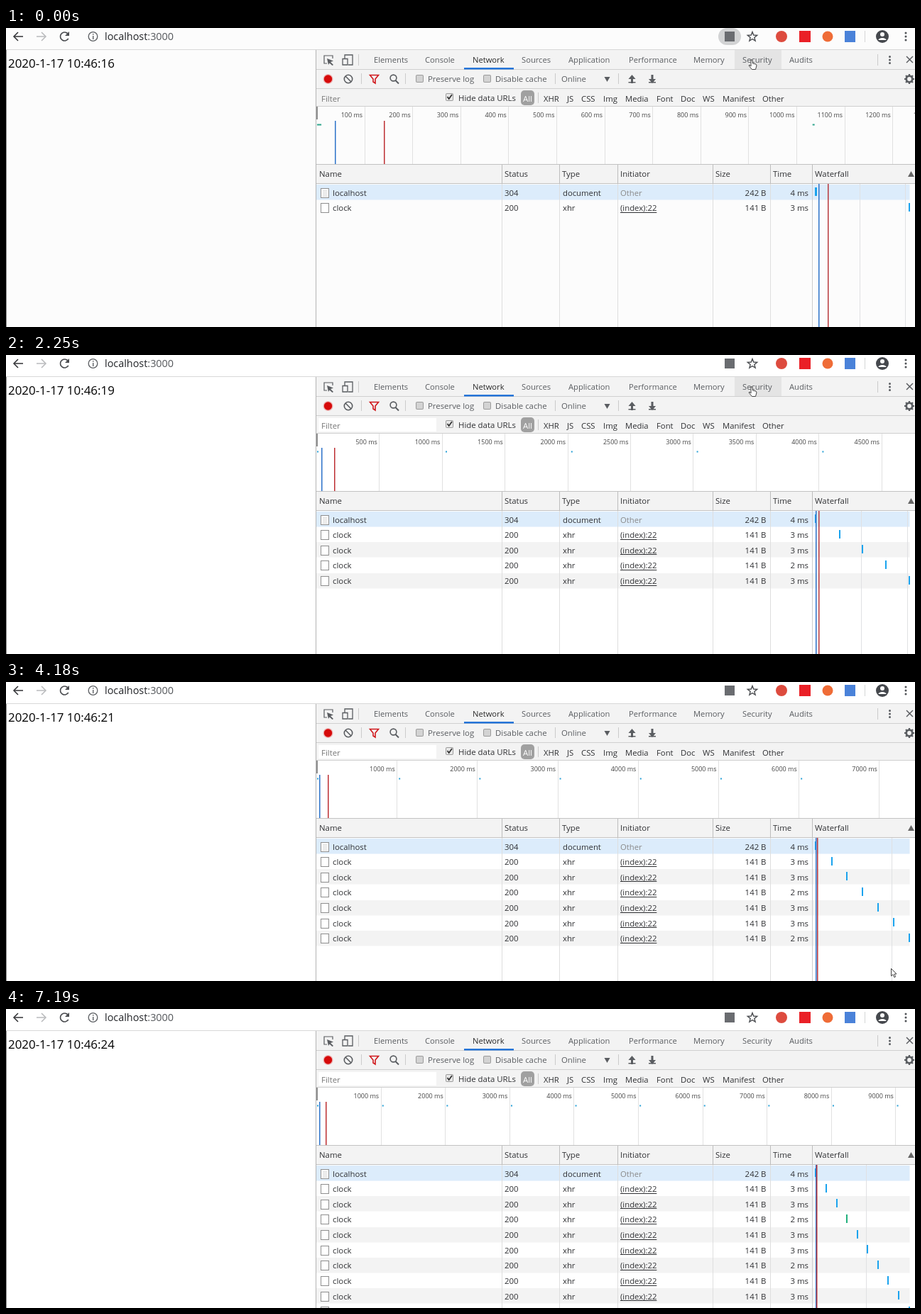
An HTML page with a canvas for the animation above (7770 ms loop, 1280 by 422 pixels).

```html
<!DOCTYPE html>
<html lang="en">
<head>
<meta charset="utf-8">
<title>Polling clock</title>
<style>
html, body { margin: 0; width: 100%; height: 100%; overflow: hidden; background: #fff; }
canvas { display: block; width: 1280px; height: 422px; }
</style>
</head>
<body>
<canvas id="stage" width="1280" height="422"></canvas>
<script>
const ctx = document.getElementById('stage').getContext('2d');
const LOOP = 7770, LEFT = 437, ROW_TOP = 221, ROW_H = 21.65;
const FONT = '"Open Sans", "Noto Sans", sans-serif';
const BAR = '#f3f3f3', INK = '#303134', GREY = '#5a5d61';

// Moments at which each part gains one more request.
const ticks = [120, 1210, 2250, 3220, 4060, 5090, 6070, 7070];
const chartSteps = [[0, 1, 1247], [240, 2, 2436], [1350, 3, 3600], [2250, 4, 4768],
  [3220, 5, 5953], [4180, 6, 7447], [6070, 8, 9305], [7190, 9, 9305]];
const pointerSteps = [[0, 1046, 45], [2530, 1047, 60], [2690, 1152, 194], [2830, 1186, 252],
  [2950, 1192, 290], [3070, 1192, 318], [3220, 1192, 331], [3370, 1197, 339], [3490, 1201, 346],
  [3640, 1218, 366], [3790, 1229, 377], [3910, 1237, 388], [4060, 1243, 397], [4180, 1246, 404],
  [4310, 1246, 412], [4430, 1246, 419], [4700, 1245, 386], [4820, 1241, 335], [4940, 1238, 299],
  [5670, 1248, 330], [5790, 1260, 368], [5910, 1272, 400], [6070, -50, -50]];

const at = (steps, t) => steps.filter(s => s[0] <= t).pop();
const sentAt = k => 1000 * k + 35;

function rect(x, y, w, h, color) {
  ctx.fillStyle = color;
  ctx.fillRect(x, y, w, h);
}
function text(s, x, y, size = 11.4, color = INK, align = 'left', weight = 400) {
  ctx.font = `${weight} ${size}px ${FONT}`;
  ctx.fillStyle = color;
  ctx.textAlign = align;
  ctx.fillText(s, x, y);
}
function trace(points, color, width = 1.5, close = false) {
  ctx.beginPath();
  points.forEach(([x, y]) => ctx.lineTo(x, y));
  if (close) ctx.closePath();
  ctx.strokeStyle = color;
  ctx.lineWidth = width;
  ctx.stroke();
}
function shape(points, color) {
  ctx.beginPath();
  points.forEach(([x, y]) => ctx.lineTo(x, y));
  ctx.fillStyle = color;
  ctx.fill();
}
function disc(x, y, r, color) {
  ctx.beginPath();
  ctx.arc(x, y, r, 0, 7);
  ctx.fillStyle = color;
  ctx.fill();
}
function ring(x, y, r, color, width = 1.5, from = 0, to = 2 * Math.PI) {
  ctx.beginPath();
  ctx.arc(x, y, r, from, to);
  ctx.strokeStyle = color;
  ctx.lineWidth = width;
  ctx.stroke();
}
function pill(x, y, w, h, r, color) {
  ctx.beginPath();
  ctx.roundRect(x, y, w, h, r);
  ctx.fillStyle = color;
  ctx.fill();
}
function dots(x, y, gap, color) {
  for (let i = -1; i <= 1; i++) disc(x, y + i * gap, 1.5, color);
}
function gridStep(pxPerMs) {
  for (let unit = 100; ; unit *= 10)
    for (const m of [1, 2, 5]) if (unit * m * pxPerMs >= 60) return unit * m;
}

function addressBar(t) {
  trace([[24, 12], [11, 12]], INK);
  trace([[17, 6], [11, 12], [17, 18]], INK);
  trace([[43, 12], [56, 12]], '#b9babc');
  trace([[50, 6], [56, 12], [50, 18]], '#b9babc');
  ring(82.5, 12, 6, '#4a4c50', 1.7, 0.5, 5.5);
  shape([[89, 5], [89, 11], [83, 11]], '#4a4c50');
  ring(122.5, 12, 6.3, GREY, 1.3);
  rect(122, 11, 1.4, 5, GREY);
  rect(122, 8, 1.4, 1.6, GREY);
  text('localhost', 139, 17, 14.4, '#222428');
  ctx.font = `14.4px ${FONT}`;
  text(':3000', 139 + ctx.measureText('localhost').width, 17, 14.4, '#54575b');

  if (t < 240) pill(1003, 0, 32, 24, 12, t < 120 ? '#d2d3d4' : '#e8e8e9');
  rect(1012, 5, 14, 14, '#6a6c70');
  const star = [];
  for (let i = 0; i < 10; i++) {
    const a = i * Math.PI / 5 - Math.PI / 2, r = i % 2 ? 3 : 7;
    star.push([1051 + r * Math.cos(a), 12.5 + r * Math.sin(a)]);
  }
  trace(star, '#4a4c50', 1.4, true);
  disc(1092, 12, 8, '#dd4b3e');
  rect(1117, 4, 16, 16, '#ea2027');
  disc(1157, 12, 7.5, '#ef6c37');
  rect(1181, 4, 15, 16, '#4a82d9');
  rect(1209, 4, 1, 16, '#d5d6d7');
  disc(1234, 12, 9, '#45484d');
  disc(1234, 9, 3, '#fff');
  ctx.beginPath();
  ctx.ellipse(1234, 17, 5.6, 3, 0, Math.PI, 0);
  ctx.fillStyle = '#fff';
  ctx.fill();
  dots(1267, 12, 5, '#505357');
}

function checkbox(x, y, checked) {
  pill(x, y, 11, 11, 2, '#9b9b9b');
  pill(x + 1, y + 1, 9, 9, 1, checked ? '#e8e8e8' : '#d3d3d3');
  if (checked) trace([[x + 2.5, y + 5], [x + 4.7, y + 8], [x + 9, y + 2]], '#333', 1.8);
}
function transferArrow(x, dir) {
  shape([[x, 72 - 6 * dir], [x + 5, 72], [x - 5, 72]], GREY);
  rect(x - 1.5, dir > 0 ? 71 : 66, 3, 7, GREY);
  rect(x - 5, 76, 10, 1.5, GREY);
}

function toolbars(t, paper) {
  rect(LEFT, 31, 843, 80, BAR);
  for (const y of [58, 85, 110]) rect(LEFT, y, 843, 1, '#cfcfcf');

  if (t < 2690) rect(1026, 31, 66, 27, '#e4e4e4');
  const tabs = [['Elements', 518], ['Console', 590], ['Network', 657], ['Sources', 726],
    ['Application', 792], ['Performance', 877], ['Memory', 968], ['Security', 1037], ['Audits', 1103]];
  for (const [name, x] of tabs) text(name, x, 49, 11.2, name === 'Network' ? '#2b2b2b' : GREY);
  rect(645, 56, 70, 2.5, '#2474d8');
  trace([[452, 50], [448, 50], [448, 39], [460, 39], [460, 43]], GREY, 1.2);
  shape([[452, 43], [461, 46.5], [457, 48], [461, 52], [459.5, 53], [455.5, 49.5], [454, 52]], GREY);
  trace([[477, 43], [477, 38], [488, 38], [488, 52], [482, 52]], GREY, 1.3);
  trace([[474, 43.5], [481, 43.5], [481, 52], [474, 52]], GREY, 1.3, true);
  rect(496, 37, 1, 16, '#cbcbcb');
  rect(1227, 37, 1, 16, '#cbcbcb');
  dots(1244.5, 45, 4.5, GREY);
  trace([[1268, 40], [1277, 49]], GREY);
  trace([[1277, 40], [1268, 49]], GREY);

  disc(453.5, 72, 7, '#edb3b3');
  disc(453.5, 72, 5.7, '#d60a0a');
  ring(482, 72, 5.7, GREY, 1.6);
  trace([[478, 68], [486, 76]], GREY, 1.6);
  for (const x of [500, 562, 773, 862]) rect(x, 64, 1, 15, '#cbcbcb');
  trace([[512.5, 66.5], [524.5, 66.5], [520, 72], [520, 78], [517, 76], [517, 72]], '#d0181c', 1.6, true);
  ring(545.5, 70.5, 4.4, GREY, 1.6);
  trace([[548.5, 74], [553, 78.5]], GREY, 2);
  checkbox(577, 66);
  text('Preserve log', 594, 76, 11.4, GREY);
  checkbox(672, 66);
  text('Disable cache', 689, 76, 11.4, GREY);
  text('Online', 782, 76, 11.4, GREY);
  shape([[842.5, 69], [850.5, 69], [846.5, 76]], GREY);
  transferArrow(881.5, 1);
  transferArrow(910, -1);
  ring(1272, 72, 4.3, GREY, 2.8);
  for (let i = 0; i < 8; i++) {
    const c = Math.cos(i * Math.PI / 4), s = Math.sin(i * Math.PI / 4);
    trace([[1272 + 5 * c, 72 + 5 * s], [1272 + 7 * c, 72 + 7 * s]], GREY, 2.2);
  }

  if (t >= 2250) rect(440, 89, 166, 19, paper);
  text('Filter', 444, 104, 11.4, '#777');
  checkbox(619, 92, true);
  text('Hide data URLs', 637, 102.5, 11.4, INK);
  pill(725, 88, 19, 21, 5, '#a0a0a0');
  text('All', 728, 103.5, 11.4, '#fff');
  rect(749, 91, 1, 15, '#cbcbcb');
  const kinds = [['XHR', 757], ['JS', 790], ['CSS', 810], ['Img', 841], ['Media', 872], ['Font', 916],
    ['Doc', 950], ['WS', 981], ['Manifest', 1009], ['Other', 1065]];
  for (const [name, x] of kinds) text(name, x, 103.5, 11.3, INK);
}

function overview(t, paper) {
  const [, count, span] = at(chartSteps, t);
  const scale = 843 / span, step = gridStep(scale);
  rect(LEFT, 111, 843, 81, paper);
  for (let ms = step; ms < span * 1.1; ms += step) {
    const x = LEFT + ms * scale;
    rect(Math.round(x), 111, 1, 81, '#e1e1e1');
    text(ms + ' ms', x - 2.5, 126, 9, '#444', 'right');
  }
  const tint = count === 1 ? '#2fa58c' : '#27a0d6';
  rect(LEFT + 1, 135.5, Math.max(2, 9 * scale), 2, tint);
  for (let k = 1; k <= count; k++)
    rect(LEFT + sentAt(k) * scale - 1, 135.5, count === 1 ? 3 : 2, 2, tint);
  rect(LEFT, 111, 2, 18, '#8f8f8f');
  rect(Math.round(LEFT + 39 * scale), 131, 1.5, 61, '#2c72c9');
  rect(Math.round(LEFT + 141 * scale), 131, 1.5, 61, '#bd2f33');
}

function fileIcon(y, lined) {
  rect(443, y - 7, 12, 14, '#8f8f8f');
  rect(444, y - 6, 10, 12, '#fff');
  if (lined) for (let i = -4; i <= 4; i += 2) rect(446, y + i, 6, 1, '#d9d9d9');
}

function table(count, pointerY) {
  const end = sentAt(count), scale = 131.5 / end;
  const timeX = ms => 1139.5 + ms * scale;
  const hovered = Math.floor((pointerY - ROW_TOP) / ROW_H);
  const columns = [['Name', 437], ['Status', 698], ['Type', 779], ['Initiator', 861],
    ['Size', 995], ['Time', 1076], ['Waterfall', 1135]];

  for (let k = 0; k <= count; k++) {
    const y = Math.round(ROW_TOP + k * ROW_H);
    const color = k === 0 ? '#dcecfb' : k === hovered ? '#eff5fd' : k % 2 ? null : BAR;
    if (color) rect(LEFT, y, 835.5, 21.5, color);
  }

  rect(LEFT, 192, 843, 28, BAR);
  rect(LEFT, 192, 843, 1, '#c2c2c2');
  rect(LEFT, 219, 843, 1, '#c2c2c2');
  columns.forEach(([name, x], i) => {
    if (i) {
      rect(x, 193, 1, 27, '#bdbdbd');
      rect(x, 220, 1, 202, i === 6 ? '#cccccc' : '#dedede');
    }
    text(name, x + 4, 210, 11.4, INK);
  });
  shape([[1274.5, 202], [1279, 210], [1270, 210]], '#666');

  const step = gridStep(scale);
  for (let ms = step; ms <= end; ms += step) rect(Math.round(timeX(ms)) - 1, 220, 1, 202, '#e0e1e3');

  for (let k = 0; k <= count; k++) {
    const mid = ROW_TOP + 11.5 + k * ROW_H, base = mid + 4;
    const doc = k === 0;
    fileIcon(Math.round(mid), doc);
    text(doc ? 'localhost' : 'clock', 460, base);
    text(doc ? '304' : '200', 702, base);
    text(doc ? 'document' : 'xhr', 784, base, 11.3);
    if (doc) text('Other', 865, base, 11.3, '#8a8a8a');
    else {
      const link = '(index):22';
      text(link, 865, base, 11.3);
      rect(865, Math.round(base + 1.5), ctx.measureText(link).width, 1, INK);
    }
    text(doc ? '242 B' : '141 B', 1070.5, base, 11.4, INK, 'right');
    text((doc ? 4 : k === 3 || k === 6 ? 2 : 3) + ' ms', 1130, base, 11.4, INK, 'right');
    const x = doc ? 1139 : Math.round(timeX(sentAt(k)) - 0.5);
    rect(x, Math.round(mid - 7.5), doc && count === 1 ? 3 : 2, 12,
      k === 3 && count === 9 ? '#21b07c' : '#1aa3ee');
  }
  rect(Math.round(timeX(39) - 0.5), 220, 1.5, 202, '#2c72c9');
  rect(Math.round(timeX(141) - 0.5), 220, 1.5, 202, '#b8383c');
}

function pointer(t, x, y) {
  ctx.save();
  ctx.translate(x, y);
  ctx.lineJoin = 'round';
  const outline = t < 2530
    ? [[3, 0], [5, 0], [5.5, 5], [10, 6], [11, 8], [9.5, 13.5], [4.5, 13.5], [0, 8], [1, 7], [3, 9]]
    : [[0.5, 0.5], [0.5, 11], [3, 8.7], [4.8, 12.8], [6.6, 12], [4.9, 8.1], [8, 8]];
  shape(outline, '#fff');
  trace(outline, '#444', 1, true);
  ctx.restore();
}

function draw() {
  const t = performance.now() % LOOP;
  const passed = ticks.filter(ms => ms <= t).length;
  const paper = t < 2250 ? '#fcfcfc' : '#ffffff';
  const [, px, py] = at(pointerSteps, t);
  rect(0, 0, 1280, 422, paper);
  addressBar(t);
  rect(0, 30, 1280, 1, '#d8d8d8');
  rect(0, 31, 1, 391, '#8c8c8c');
  text('2020-1-17 10:46:' + (16 + passed), 3, 56, 16.9, '#000');
  toolbars(t, paper);
  overview(t, paper);
  table(passed + 1, py);
  rect(436, 31, 1, 391, '#b4b4b4');
  pointer(t, px, py);
  requestAnimationFrame(draw);
}
draw();
</script>
</body>
</html>
```
